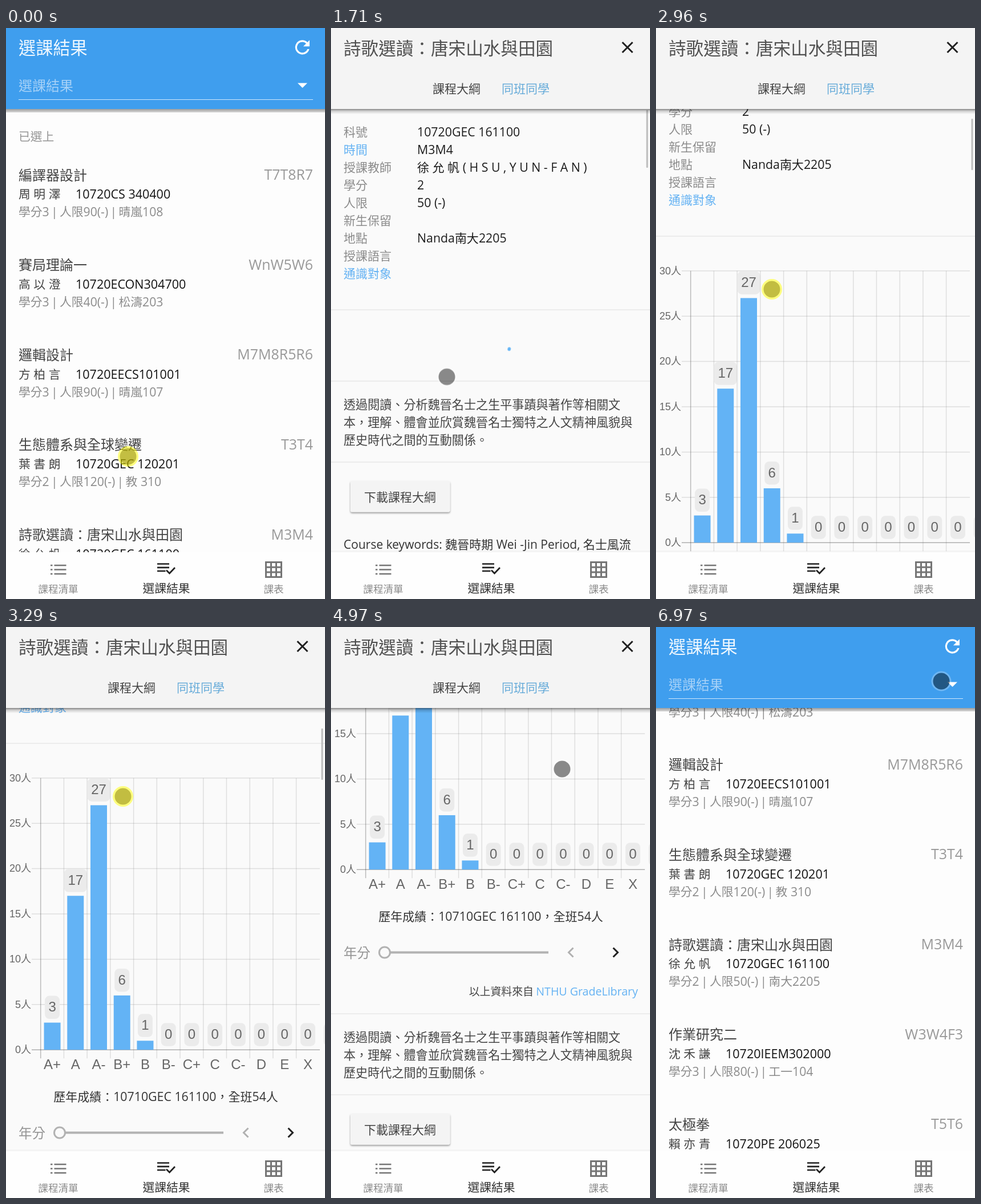
Write an HTML page that moves like this. It is 559 by 1001 pixels and loops after 7040 ms.

```html
<!DOCTYPE html>
<html lang="zh-Hant">
<head>
<meta charset="utf-8">
<title>選課結果</title>
<style>
  html, body { margin: 0; width: 100%; height: 100%; overflow: hidden; background: #fdfdfd; }
  svg { display: block; width: 100vw; height: 100vh; }
  text { font-family: "Noto Sans CJK TC", "Noto Sans CJK JP", sans-serif; font-weight: 300; white-space: pre; }
  .latin { font-family: "Open Sans", "Noto Sans", sans-serif; font-weight: 400; }
  .plain, .plain .latin { font-family: "Liberation Sans", Arial, sans-serif; font-weight: 400; }
  .tight { word-spacing: -2.2px; }
  .bar { transform-box: fill-box; transform-origin: 50% 100%; }
  #spinner { transform-origin: 280px 556px; }
</style>
</head>
<body>
<svg viewBox="0 0 559 1001">
  <defs>
    <linearGradient id="shade" x2="0" y2="1">
      <stop offset="0" stop-opacity=".38"/><stop offset="1" stop-opacity=".14"/>
    </linearGradient>
    <linearGradient id="softShade" x2="0" y2="1">
      <stop offset="0" stop-opacity=".48"/><stop offset=".4" stop-opacity=".17"/><stop offset="1" stop-opacity="0"/>
    </linearGradient>
    <filter id="lift" x="-10%" y="-20%" width="120%" height="150%">
      <feDropShadow dx="0" dy="2" stdDeviation="1.8" flood-opacity=".4"/>
    </filter>
  </defs>

  <g id="listPage">
    <rect width="559" height="1001" fill="#fdfdfd"/>
    <g id="rows"></g>
    <rect id="listBar" x="552.5" y="148" width="3" height="467" rx="1" fill="#b8b8b8"/>
    <rect y="142" width="559" height="6" fill="url(#shade)"/>
    <rect width="559" height="142" fill="#3f9eee"/>
    <g id="listHead"></g>
    <path transform="translate(500.5 15) scale(1.57)" fill="#fff" d="M17.65 6.35A7.96 7.96 0 0 0 12 4a8 8 0 1 0 7.73 10h-2.08A6 6 0 1 1 12 6c1.66 0 3.14.69 4.22 1.78L13 11h7V4z"/>
    <path d="M511 96.5h17l-8.500 8.500z" fill="#fff"/>
    <path d="M22 125.500H538" stroke="#fff" stroke-opacity=".75"/>
  </g>

  <g id="detailPage">
    <rect width="559" height="1001" fill="#fafafa"/>
    <g id="content">
      <g id="scroller">
        <g id="info"></g>
        <circle id="spinner" cx="280" cy="556" r="33" fill="none" stroke="#64b5f6" stroke-width="5.500" stroke-linecap="round"/>
        <g id="chart"></g>
        <g id="notes"></g>
      </g>
      <rect id="detailBar" x="552.5" y="144" width="3" height="90" rx="1" fill="#bcbcbc"/>
    </g>
    <rect y="142" width="559" height="9" fill="url(#softShade)"/>
    <rect width="559" height="142" fill="#f4f4f4"/>
    <g id="detailHead"></g>
    <circle id="ripple" cx="520" cy="34" r="27" fill-opacity=".12"/>
    <path d="M510.500 25l18 18m0-18l-18 18" stroke="#212121" stroke-width="3"/>
    <rect y="916" width="559" height="3" fill-opacity=".025"/>
  </g>

  <g id="nav">
    <rect y="919" width="559" height="82" fill="#fefefe"/>
    <path d="M78 942h3.500m3 0H105.500M78 949.500h3.500m3 0H105.500M78 957h3.500m3 0H105.500" stroke="#757575" stroke-width="2.700"/>
    <path d="M265 939.500h21M265 945.800h21M265 952h14.500M281 950.500l5.500 5.500 9.500-10" fill="none" stroke="#212121" stroke-width="2.700"/>
    <path d="M455.500 936.500h27v26h-27zM464.500 936.500v26m9-26v26M455.500 945.200h27m-27 8.700h27" fill="none" stroke="#757575" stroke-width="3"/>
  </g>

  <g id="touch">
    <g id="idle">
      <circle r="16" fill="none" stroke="#fff" stroke-width="3" stroke-opacity=".25"/>
      <circle r="14.500" fill-opacity=".45"/>
    </g>
    <g id="pressed">
      <circle r="18" fill="#ff0" fill-opacity=".5"/>
      <circle r="14.500" fill="#827800" fill-opacity=".48"/>
    </g>
  </g>
</svg>

<script>
const LOOP = 7040;
const GREY = '#8b8b8b', INK = '#444', DARK = '#1c1c1c', BLUE = '#64b2f3';
const $ = id => document.getElementById(id);
const add = (id, ...parts) => $(id).insertAdjacentHTML('beforeend', parts.join(''));

// y is the visual middle of the line; Latin runs get their own size
const latin = (run, size) =>
  `<tspan class="latin${run.includes('|') ? ' tight' : ''}" font-size="${size}">${run}</tspan>`;
const text = (x, y, str, { c = 21, l = 21.3, fill = INK, anchor = 'start', cls = '' } = {}) =>
  `<text class="${cls}" x="${x}" y="${y + 0.38 * c}" font-size="${c}" fill="${fill}" text-anchor="${anchor}">` +
  str.replace(/[ -~]+/g, run => latin(run, l)) + '</text>';
const rule = y => `<path d="M0 ${y}H559" stroke="#dedede"/>`;

// Course list
const courses = [
  ['編譯器設計', 'T7T8R7', '周 明 澤', '10720CS 340400', '學分3 | 人限90(-) | 晴嵐108'],
  ['賽局理論一', 'WnW5W6', '高 以 澄', '10720ECON304700', '學分3 | 人限40(-) | 松濤203'],
  ['邏輯設計', 'M7M8R5R6', '方 柏 言', '10720EECS101001', '學分3 | 人限90(-) | 晴嵐107'],
  ['生態體系與全球變遷', 'T3T4', '葉 書 朗', '10720GEC 120201', '學分2 | 人限120(-) | 教 310'],
  ['詩歌選讀：唐宋山水與田園', 'M3M4', '徐 允 帆', '10720GEC 161100', '學分2 | 人限50(-) | 南大2205'],
  ['作業研究二', 'W3W4F3', '沈 禾 謙', '10720IEEM302000', '學分3 | 人限80(-) | 工一104'],
  ['太極拳', 'T5T6', '賴 亦 青', '10720PE 206025', '']
];
add('rows', text(22, 190, '已選上', { c: 20.8, fill: '#959595' }));
courses.forEach(([title, slot, teacher, code, facts], i) => {
  const y = 257.5 + i * 157.6;
  add('rows',
    text(22, y, title, { c: 24 }),
    text(538, y - 0.5, slot, { c: 24, l: 24.9, fill: '#999', anchor: 'end' }),
    text(22, y + 34, teacher, { c: 20.8 }),
    text(122, y + 34, code, { l: 21.5, fill: '#111' }),
    text(22, y + 65, facts, { c: 20.8, l: 21.2, fill: GREY }));
});
add('listHead',
  text(22, 35, '選課結果', { c: 30.2, fill: '#f0f8fe' }),
  text(22, 101, '選課結果', { c: 24, fill: '#a6d1f7' }));

// Course detail
add('detailHead',
  `<g id="heading">${text(22, 35, courses[4][0], { c: 30.6, fill: '#505050' })}</g>`,
  text(178, 106, '課程大綱'),
  text(299, 106, '同班同學', { fill: '#66abd9' }));

const fields = [
  ['科號', '10720GEC 161100'], ['時間', 'M3M4'],
  ['授課教師', '徐 允 帆 ( H S U , Y U N - F A N )'],
  ['學分', '2'], ['人限', '50 (-)'], ['新生保留', ''],
  ['地點', 'Nanda南大2205'], ['授課語言', ''], ['通識對象', '']
];
fields.forEach(([label, value], i) => add('info',
  text(22, 182 + 31 * i, label, { fill: i === 1 || i === 8 ? BLUE : GREY }),
  text(151, 182 + 31 * i, value, { fill: DARK })));
add('info', rule(494));

add('notes', rule(619),
  ['透過閱讀、分析魏晉名士之生平事蹟與著作等相關文',
   '本，理解、體會並欣賞魏晉名士獨特之人文精神風貌與',
   '歷史時代之間的互動關係。'].map((s, i) => text(22, 660 + 31 * i, s, { c: 21.1 })).join(''),
  rule(761),
  '<rect x="34" y="794" width="174.500" height="54.500" rx="3" fill="#f4f4f4" filter="url(#lift)"/>',
  text(121, 822, '下載課程大綱', { anchor: 'middle' }),
  text(22, 905, 'Course keywords: 魏晉時期 Wei -Jin Period, 名士風流', { l: 21, fill: '#333' }));

// Grade chart
const grades = ['A+', 'A', 'A-', 'B+', 'B', 'B-', 'C+', 'C', 'C-', 'D', 'E', 'X', ''];
const counts = [3, 17, 27, 6, 1];
const ZERO = 1031.2, UNIT = 15.88, LEFT = 60.7, COL = 40.72;
for (let n = 0; n <= 30; n += 5) {
  const y = ZERO - n * UNIT;
  add('chart',
    `<path d="M45 ${y}H550" stroke="#000" stroke-width="1.500" stroke-opacity="${n ? 0.11 : 0.3}"/>`,
    text(44, y - 1, n + '人', { c: 18, l: 18, fill: '#666', anchor: 'end', cls: 'plain' }));
}
grades.forEach((grade, i) => {
  const x = LEFT + i * COL, mid = x + COL / 2, n = counts[i] || 0, top = ZERO - n * UNIT;
  const w = n > 9 ? 40 : 26;
  if (grade) add('chart', `<path d="M${x} ${ZERO - 30 * UNIT}V${ZERO + 15}" stroke="#000" stroke-width="1.500" stroke-opacity="${i ? 0.11 : 0.25}"/>`);
  if (n) add('chart', `<rect class="bar" x="${mid - 14.5}" y="${top}" width="29" height="${n * UNIT}" fill="#63b3f5"/>`);
  add('chart',
    `<g class="count" data-n="${n}"><rect x="${mid - w / 2}" y="${top - 47}" width="${w}" height="40.500" rx="8" fill="#ebebeb"/>` +
    text(mid, top - 28.5, String(n), { c: 24, l: 24, fill: '#666', anchor: 'middle', cls: 'plain' }) + '</g>',
    text(mid, ZERO + 24.5, grade, { c: 24, l: 24, fill: '#666', anchor: 'middle', cls: 'plain' }));
});
add('chart',
  text(280, 1113, '歷年成績：10710GEC 161100，全班54人', { anchor: 'middle', fill: '#333' }),
  text(22, 1177, '年分', { c: 23.5, fill: '#959595' }),
  '<path d="M104 1176.500H381" stroke="#b2b2b2" stroke-width="4"/>',
  '<circle cx="94" cy="1176.500" r="9.500" fill="none" stroke="#b2b2b2" stroke-width="3"/>',
  '<path d="M424.500 1168.500l-8 8 8 8" fill="none" stroke="#b0b0b0" stroke-width="3"/>',
  '<path d="M494.500 1168.500l8 8-8 8" fill="none" stroke="#212121" stroke-width="3"/>',
  text(355, 1245, '以上資料來自', { c: 18.9, anchor: 'end' }),
  text(538, 1245, 'NTHU GradeLibrary', { c: 19, l: 19.6, fill: BLUE, anchor: 'end' }));

add('nav',
  text(91.5, 983, '課程清單', { c: 17.6, fill: GREY, anchor: 'middle' }),
  text(281, 982, '選課結果', { c: 20.8, fill: '#333', anchor: 'middle' }),
  text(469, 983, '課表', { c: 17.6, fill: GREY, anchor: 'middle' }));

// Motion: stops are [ms, value, easing?]; the last value holds to the end of the loop
function play(el, prop, stops, easing = 'linear') {
  const frames = stops.map(([ms, value, own = easing]) => ({ offset: ms / LOOP, [prop]: value, easing: own }));
  frames.push({ offset: 1, [prop]: stops.at(-1)[1] });
  el.animate(frames, { duration: LOOP, iterations: Infinity });
}
const shiftY = (stops, k = 1) => stops.map(([ms, y]) => [ms, `translate(0px, ${y * k}px)`]);
const show = (id, from, to) =>
  play($(id), 'visibility', [[0, 'hidden'], [from, 'visible'], [to, 'hidden']], 'step-end');

const OPEN = 1460, FILLED = 1520, LOADED = 1960, CLOSED = 6830;

const listScroll = [[0, 0], [50, 20], [120, 118], [170, 193], [240, 227], [310, 303], [380, 331], [690, 331.5]];
play($('rows'), 'transform', shiftY(listScroll, -1), 'step-end');
play($('listBar'), 'transform', shiftY(listScroll, 0.593), 'step-end');
play($('listBar'), 'opacity', [[0, 0, 'step-end'], [50, 1], [540, 1], [690, 0]]);

show('detailPage', OPEN, CLOSED);
for (const id of ['heading', 'content']) play($(id), 'opacity', [[0, 0], [FILLED, 1]], 'step-end');

const detailScroll = [[0, 0], [2340, 0], [2960, 129], [3030, 129], [3290, 290], [3790, 290], [4130, 481], [4200, 481], [4390, 606]];
play($('scroller'), 'transform', shiftY(detailScroll, -1));
play($('detailBar'), 'transform', shiftY(detailScroll, 0.117));
play($('detailBar'), 'height', [[0, '101px'], [LOADED, '90px']], 'step-end');
play($('detailBar'), 'opacity', [[0, 1], [4700, 1], [4830, 0]]);

play($('spinner'), 'opacity', [[0, 0], [1650, 1], [LOADED, 0]], 'step-end');
play($('spinner'), 'transform', [[0, 'rotate(0deg)'], [1650, 'rotate(0deg)'], [LOADED, 'rotate(56deg)']]);
play($('spinner'), 'strokeDasharray', [[0, '1 400'], [1760, '1 400'], [LOADED, '70 400']]);

play($('chart'), 'opacity', [[0, 0], [LOADED, 1]], 'step-end');
play($('notes'), 'transform', shiftY([[0, 0], [LOADED, 665]]), 'step-end');
const outQuart = 'cubic-bezier(.25, 1, .5, 1)';
document.querySelectorAll('.bar').forEach(bar =>
  play(bar, 'transform', [[0, 'scaleY(0)'], [LOADED, 'scaleY(0)'], [LOADED + 960, 'scaleY(1)']], outQuart));
document.querySelectorAll('.count').forEach(tag => {
  const rise = tag.dataset.n * UNIT;
  play(tag, 'transform', shiftY([[0, rise], [LOADED, rise], [LOADED + 960, 0]]), outQuart);
});

// The finger drags the list in steps, then glides
const path = [
  ...listScroll.map(([ms, y]) => [ms, 214 - 0.04 * y, 751 - y, 'step-end']),
  [760, 201, 421], [1100, 203, 611.5], [2270, 203, 611.5], [2340, 203, 587], [2960, 203, 458],
  [3030, 203, 458], [3290, 205, 297], [3470, 205, 297], [3760, 232, 795], [3790, 232, 795],
  [4130, 227, 604], [4200, 227, 604], [4390, 223, 479], [4700, 223, 479], [4970, 405, 249], [5020, 405, 249],
  [5260, 503, 38], [5460, 503, 38], [5510, 512.5, 28.5, 'step-end'], [6970, 500, 95]
];
play($('touch'), 'transform', path.map(([ms, x, y, easing]) => [ms, `translate(${x}px, ${y}px)`, easing]));

const taps = [[0, 450], [1180, 1310], [2270, 3400], [3760, 4450], [5890, 6020]];
const pressStops = (on, off) => taps.flatMap(([down, up]) => [[down, on], [up, off]]);
play($('pressed'), 'opacity', pressStops(1, 0), 'step-end');
play($('idle'), 'opacity', pressStops(0, 1), 'step-end');
play($('ripple'), 'opacity', [[0, 0], [6210, 1], [6330, 0]], 'step-end');
</script>
</body>
</html>
```
